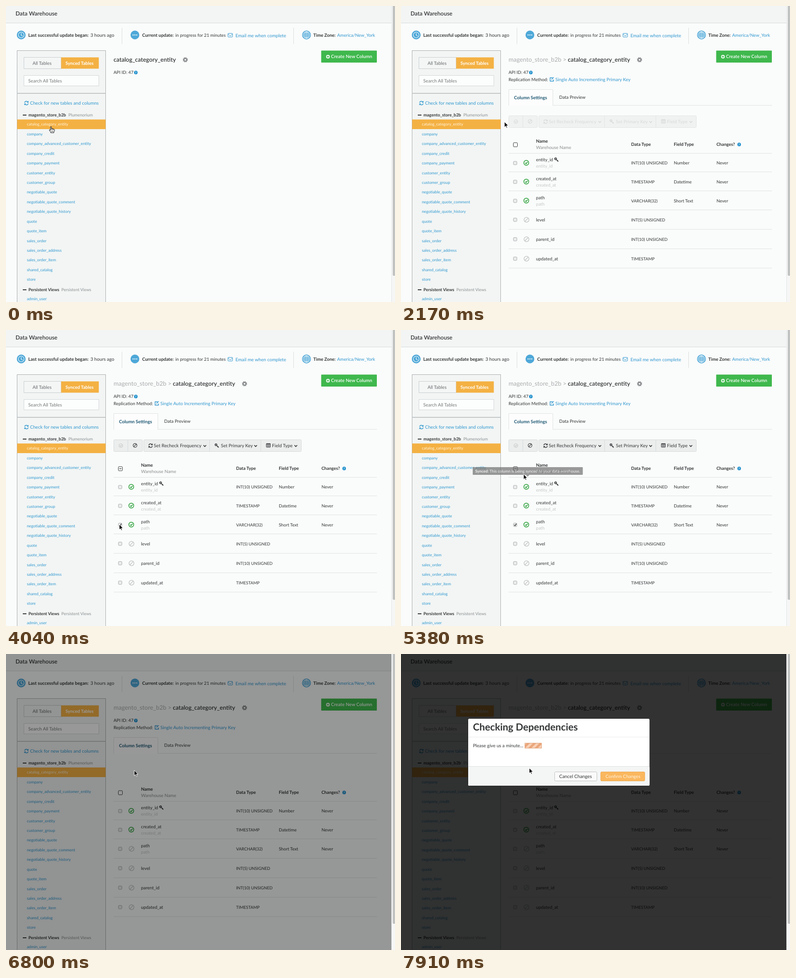
Write an HTML page that moves like this. It is 857x654 px and loops after 7.99 s.

```html
<!DOCTYPE html>
<html lang="en">
<head>
<meta charset="utf-8">
<title>Data Warehouse</title>
<style>
html, body { margin: 0; width: 857px; height: 654px; overflow: hidden; background: #fafbfb; }
svg { display: block; font-family: Lato, "Open Sans", sans-serif; text-rendering: geometricPrecision; }
text { white-space: pre; }
</style>
</head>
<body>
<svg id="stage" width="857" height="654" viewBox="0 0 857 654"></svg>
<script>
const LOOP = 7990;
const INK = '#333536', BLUE = '#2f97cf', SKY = '#4ea8d8', AMBER = '#f4b143', GREEN = '#35a543',
      RULE = '#e0e2e2', MUTED = '#8a8d8e', PALE = '#c6c8c8';

// Drawing helpers
const text = (x, y, str, size = 9.8, fill = INK, weight = 400) =>
  `<text x="${x}" y="${y}" font-size="${size}" fill="${fill}" font-weight="${weight}">${str}</text>`;
const bold = (x, y, str, size = 9.9, fill = INK) => text(x, y, str, size, fill, 700);
const rect = (x, y, w, h, fill, stroke = 'none', r = 0) =>
  `<rect x="${x}" y="${y}" width="${w}" height="${h}" fill="${fill}" stroke="${stroke}" rx="${r}"/>`;
const path = (d, stroke, width = 1, fill = 'none') =>
  `<path d="${d}" stroke="${stroke}" stroke-width="${width}" fill="${fill}"/>`;
const dot = (x, y, r, fill, stroke = 'none', width = 1) =>
  `<circle cx="${x}" cy="${y}" r="${r}" fill="${fill}" stroke="${stroke}" stroke-width="${width}"/>`;
const group = (id, body) => `<g id="${id}">${body}</g>`;

// Icons
const tick = (x, y, c, r = 5.4) => dot(x, y, r, 'none', c, r / 3.4) +
  path(`M${x - r * .46} ${y}l${r * .36} ${r * .38} ${r * .62} ${-r * .72}`, c, r / 3);
const ban = (x, y, c, r = 5.4) => dot(x, y, r, 'none', c, r / 3.6) +
  path(`M${x - r * .66} ${y + r * .66}l${r * 1.32} ${-r * 1.32}`, c, r / 3.6);
const help = (x, y) => dot(x, y, 3.9, '#2090cc') + bold(x - 1.7, y + 2.5, '?', 7, '#fff');
const gear = (x, y) => dot(x, y, 3.2, 'none', MUTED, 2.6) +
  `<circle cx="${x}" cy="${y}" r="4.8" fill="none" stroke="${MUTED}" stroke-width="1.8" stroke-dasharray="1.885"/>`;
const refresh = (x, y, c) =>
  path(`M${x - 4} ${y - .8}a4 4 0 0 1 7-1.8M${x + 4} ${y + .8}a4 4 0 0 1-7 1.8`, c, 1.5) +
  path(`M${x + 4.6} ${y - 5}v4h-4zM${x - 4.6} ${y + 5}v-4h4z`, 'none', 0, c);
const wrench = (x, y, c) => dot(x - 1.9, y - 1.9, 2, 'none', c, 1.6) +
  path(`M${x - .5} ${y - .5}l4.6 4.6M${x + 1.4} ${y + 3.2}l1.8-1.8`, c, 1.5);
const chevron = (x, y, c) => path(`M${x - 3} ${y - 1.5}l3 3 3-3`, c, 1.7);
const grid = (x, y, c) => rect(x - 4.5, y - 4, 9, 8, 'none', c, .5) +
  path(`M${x - 4.5} ${y - 3}h9`, c, 1.6) + path(`M${x - 4.5} ${y + 1}h9M${x - 1.5} ${y - 4}v8M${x + 1.5} ${y - 4}v8`, c, .9);
const minus = y => path(`M37 ${y}h8`, INK, 2);
const box = (x, y, size, stroke, fill) => rect(x - size / 2, y - size / 2, size, size, fill, stroke, 1.5);
const loader = (x, y, base, edge) => rect(x, y, 36.5, 11, base) + rect(x, y, 36.5, 11, 'url(#stripes)', edge);

function header() {
  return rect(0, 0, 849, 37, '#f3f5f5') + path('M0 37.5H849', '#d6dada') +
    text(21, 21, 'Data Warehouse', 12.5, INK, 600) +
    dot(33.5, 64, 9.7, SKY) + dot(33.5, 64, 6.3, 'none', '#fff', 1.1) + path('M33.5 60v4.5l3 1.8', '#fff', 1.1) +
    bold(49, 68, 'Last successful update began:', 10.1) + text(186, 68, '3 hours ago', 10.2) +
    path('M255.5 48v36M633.5 48v36', '#dbdede') +
    dot(284, 64, 9.7, SKY) + [-4, 0, 4].map(d => dot(284 + d, 64, 1.2, '#fff')).join('') +
    bold(300, 68, 'Current update:') + text(373, 68, 'in progress for 21 minutes', 9.7) +
    rect(489, 60.5, 10, 8, 'none', BLUE, 1) + path('M489 62l5 4 5-4', BLUE) +
    text(505.5, 68.5, 'Email me when complete', 10.2, BLUE) +
    dot(662, 64, 9.7, SKY) + dot(662, 64, 7.4, 'none', '#fff') +
    [1.4, 4.6].map(r => `<ellipse cx="662" cy="64" rx="${r}" ry="7.4" fill="none" stroke="#fff"/>`).join('') +
    bold(677, 68, 'Time Zone:') + text(729.5, 68, 'America/New_York', 9.8, BLUE);
}

function sidebar() {
  const tables = ['catalog_category_entity', 'company', 'company_advanced_customer_entity', 'company_credit',
    'company_payment', 'customer_entity', 'customer_group', 'negotiable_quote', 'negotiable_quote_comment',
    'negotiable_quote_history', 'quote', 'quote_item', 'sales_order', 'sales_order_address',
    'sales_order_item', 'shared_catalog', 'store'];
  return rect(24.5, 98.5, 195, 570, '#f2f5f4', '#a9adae') + path('M24 193H220', '#b4b8b9', 1.4) +
    rect(39.5, 113.5, 82, 25, '#f4f6f6', '#c9cdcd') + text(58.5, 130, 'All Tables', 10.2, '#66696a') +
    rect(121.5, 113.5, 83, 25, AMBER) + bold(131, 130, 'Synced Tables', 10, '#fff') +
    rect(39.5, 153.5, 165, 23, '#fcfdfd', '#d3d7d7') + text(49, 169, 'Search All Tables', 10.2, '#77797a') +
    refresh(45, 214.5, BLUE) + text(53, 218.2, 'Check for new tables and columns', 10.1, BLUE) +
    minus(241) + bold(49.5, 244, 'magento_store_b2b', 9.4) + text(137.5, 244, 'Plumenorium', 9.2, MUTED) +
    rect(24.5, 250.7, 195, 21.3, AMBER) + group('hover', rect(25, 273, 194, 21, '#e5e9e9')) +
    tables.map((name, i) => text(46, 264.3 + i * 21.44, name, 8.72, i ? BLUE : '#fff6e3')).join('') +
    minus(627) + bold(49.5, 629.5, 'Persistent Views', 9.2) + text(122, 629.5, 'Persistent Views', 9.1, MUTED) +
    text(46, 650.3, 'admin_user', 8.72, BLUE);
}

function toolbar(c) {
  const edge = '#d6d9d9';
  return rect(237.5, 242.5, 63, 26, '#eceeee', edge, 2) + rect(303.5, 242.5, 347, 26, '#eceeee', edge, 2) +
    `<rect class="press" x="269" y="243" width="31" height="25" fill="#d3d6d6" stroke="#bfc2c2"/>` +
    path('M268.5 242v27M448.5 242v27M561.5 242v27', edge) +
    tick(253, 255.5, PALE, 4) + ban(284.3, 255, c, 4.2) +
    refresh(318.5, 255.5, c) + text(325.5, 259, 'Set Recheck Frequency', 10.3, c) + chevron(438, 256, c) +
    wrench(464.5, 255.5, c) + text(473.5, 259, 'Set Primary Key', 10.1, c) + chevron(550, 256, c) +
    grid(578, 255, c) + text(586, 259, 'Field Type', 10.2, c) + chevron(638.5, 256, c);
}

function row(y, name, type, field) {
  const base = y + 3.3;
  const cells = box(251.5, y, 7.5, '#a7aaab', '#eceded') + text(507, base, type, 9.2);
  if (!field) return cells + ban(276.5, y, PALE) + text(297.5, base, name, 9.9);
  return cells + (name === 'path' ? group('synced', tick(276, y - .5, GREEN)) + group('unsynced', ban(276.5, y, PALE))
                                  : tick(276, y - .5, GREEN)) +
    text(297.5, y - 3.8, name, 9.8) + text(297.5, y + 10.3, name, 9.6, PALE) +
    text(601, base, field, 9.6) + text(695, base, 'Never', 9.7);
}

function table() {
  const line = y => path(`M237 ${y}H817`, RULE);
  return bold(297.5, 302, 'Name') + text(297.5, 316, 'Warehouse Name', 9.9, MUTED) +
    bold(507, 309.3, 'Data Type', 9.7) + bold(601, 309.3, 'Field Type', 9.8) + bold(695, 309.3, 'Changes?', 9.6) +
    help(745, 306) + box(252, 306.5, 9, INK, '#fdfdfd') + group('partial', path('M249.5 306.5h5', INK, 1.3)) +
    [325.5, 366.5, 408.5].map(line).join('') +
    row(347, 'entity_id', 'INT(10) UNSIGNED', 'Number') + wrench(342.5, 339.5, INK) +
    row(388.5, 'created_at', 'TIMESTAMP', 'Datetime') +
    row(430.5, 'path', 'VARCHAR(32)', 'Short Text') +
    group('checked', path('M249.3 430.5l2 2 3-4.5', INK, 1.4)) +
    group('lower', [450.5, 493.5, 536.5, 579].map(line).join('') + row(472.3, 'level', 'INT(5) UNSIGNED') +
      row(515.3, 'parent_id', 'INT(10) UNSIGNED') + row(558.3, 'updated_at', 'TIMESTAMP'));
}

function details() {
  return text(237, 123, 'magento_store_b2b &gt;', 13.4, '#aaadae') +
    text(367.5, 123, 'catalog_category_entity', 13, INK, 600) + gear(525.5, 118.8) +
    text(237, 165.8, 'Replication Method:', 9.8) +
    path('M334 158.5h-5.5v7.5h7.5v-3.5M331.5 162.5l5-5', BLUE, 1.4) +
    text(340, 166, 'Single Auto Incrementing Primary Key', 10, BLUE) +
    path('M334.5 219.5V184.5H237.5V220', RULE, 1, '#fdfdfd') + path('M334 219.5H817', RULE) +
    bold(249, 206, 'Column Settings', 10, '#1c5672') + text(348.5, 205, 'Data Preview', 9.9) +
    group('idle', toolbar(PALE)) + group('active', toolbar(INK)) + table();
}

const tip = (id, x, y, w, arrow, label) => group(id, rect(x, y, w, 17, '#6f706f', 'none', 1) +
  path(`M${arrow - 4} ${y + 17}h8l-4 4z`, 'none', 0, '#6f706f') + text(x + 5.5, y + 11.7, label, 8.68, '#f3f3f3'));

function modal() {
  return rect(147.5, 142.5, 400.5, 149, '#fff', '#222', 3) + path('M148 183.5H547', '#e9eaea') +
    bold(158.5, 169.3, 'Checking Dependencies', 21.6) +
    text(158.5, 206, 'Please give us a minute...', 10.2) + loader(273, 197, '#f8d0b6', '#e09a6c') +
    rect(148, 249, 399.5, 42, '#f4f5f5', 'none', 2) + path('M148 248.5H547', '#dcdede') +
    rect(338.5, 260.5, 93, 20, '#fafafa', '#bfc1c1', 2) + text(348.5, 273.8, 'Cancel Changes', 10.35) +
    rect(440, 260.5, 97, 20, '#fab75e', '#eda94f', 2) + text(450.5, 273.8, 'Confirm Changes', 10.2, '#fff3e0');
}

const stage = document.getElementById('stage');
stage.innerHTML =
  `<defs><pattern id="stripes" width="14" height="14" patternUnits="userSpaceOnUse">${rect(0, 0, 7, 14, '#eaa67b')}</pattern></defs>` +
  rect(0, 0, 857, 654, '#fafbfb') + header() + sidebar() +
  rect(694.4, 98.4, 122.6, 26.6, '#3fb84d', 'none', 1) + dot(709.3, 112, 4, '#fff') +
  path('M706.8 112h5M709.3 109.5v5', '#3fb84d', 1.4) + text(716, 115.3, 'Create New Column', 10.2, '#fff', 600) +
  text(237, 150.3, 'API ID: 47', 9.7) + help(286, 147) +
  group('loading', text(237, 123, 'catalog_category_entity', 13, INK, 600) + gear(395, 118.8)) +
  group('details', details()) +
  tip('syncedTip', 158, 303, 242.5, 279, '<tspan font-weight="700">Synced</tspan>: This column is being synced to your data warehouse.') +
  tip('stopTip', 168.5, 218, 231, 284.5, 'Stop syncing selected column(s) from your data warehouse') +
  group('shade', rect(0, 0, 849, 654, '#000')) +
  group('busy', `<g opacity=".45">${loader(509, 258, '#b0582a', '#b0582a')}</g>`) +
  group('modal', modal()) +
  rect(849, 0, 8, 654, '#f6f6f6') + path('M849.5 0V654', '#e4e5e5') + rect(852, -4, 8, 600, '#c1c2c2', 'none', 2) +
  group('arrow', path('M0 0V11.8L2.8 9.2 4.7 13.4 6.5 12.6 4.7 8.5H8.4Z', '#fff', 1, '#000')) +
  group('hand', path('M-1 1.2Q0-.6 1.2 1.2V5.4L3 5 5 5.6 7 6.3 8 7.6 7.6 10.6 6.5 12.4V14H-.6V12.6L-3.6 8.6Q-3.6 6.9-2 7.6L-1 8.8Z', '#000', 1, '#fff') +
    path('M1.2 5.5V8M3.4 5.6V8M5.5 6.2V8.2M1.2 9.6v2.6M3 9.6v2.6M4.8 9.6v2.6', '#000', .7));

const bursts = [[0, 0, 1], [90, 90, 1], [240, 1020, 10], [1650, 2440, 10], [2530, 3140, 8], [3950, 4040, 2],
  [4850, 5630, 10], [5720, 6080, 5], [6710, 6890, 3], [7040, 7040, 1], [7190, 7370, 3], [7640, 7910, 4]];
function heldTime(t) {
  const [start, end, steps] = bursts.findLast(b => b[0] <= t);
  const step = (end - start) / (steps - 1) || 1;
  return Math.min(end, start + Math.floor((t - start) / step + .15) * step);
}

// Keys are [time, ...values]
const cursorKeys = [[0, 99, 266], [90, 101, 265], [240, 102, 264], [1020, 107, 279], [1650, 107, 279],
  [1900, 155, 271], [2175, 228, 256], [2440, 214, 260], [2600, 222, 290], [2880, 285, 395], [3140, 249.5, 429.5],
  [4800, 249.5, 429.5], [5110, 268, 372], [5200, 272, 348], [5370, 270, 318.5], [5630, 280, 284],
  [5990, 284, 258], [6710, 284, 258], [6800, 282.5, 257], [7640, 282.5, 257], [7910, 282.5, 252]];
const modalKeys = [[7040, -193, .4], [7190, -80, .8], [7280, -25, .95], [7370, 0, 1]];
function at(keys, t) {
  const i = keys.findIndex(k => k[0] > t);
  if (i < 0) return keys.at(-1).slice(1);
  if (!i) return keys[0].slice(1);
  const a = keys[i - 1], b = keys[i], u = (t - a[0]) / (b[0] - a[0]);
  return a.slice(1).map((v, j) => v + (b[j + 1] - v) * u);
}

const el = id => document.getElementById(id);
const fade = (id, opacity) => {
  el(id).style.display = opacity > 0 ? '' : 'none';
  el(id).style.opacity = +opacity;
};
const presses = document.querySelectorAll('.press');

function render(now) {
  const t = heldTime(now % LOOP);
  const loaded = t >= 1650, removed = t >= 6790;
  fade('hover', t > 600 && t < 1800);
  fade('loading', !loaded);
  fade('details', loaded);
  fade('idle', t < 4030 ? .65 : 0);
  fade('active', t >= 4030 && !removed);
  fade('partial', t >= 4030 && !removed);
  fade('checked', t >= 3950 && !removed);
  fade('synced', !removed);
  fade('unsynced', removed);
  el('lower').setAttribute('transform', `translate(0 ${+removed})`);
  presses.forEach(p => {
    p.style.display = t > 5880 ? '' : 'none';
    p.style.fill = t >= 6710 ? '#d0d3d3' : '#dcdede';
  });

  fade('syncedTip', t < 5190 || t > 5440 ? 0 : t > 5330 ? .7 : 1);
  fade('stopTip', t < 5880 || removed ? 0 : t < 5980 ? .5 : 1);
  fade('shade', t < 6790 ? 0 : t < 6880 ? .4 : .8);
  fade('busy', t >= 6880);

  const [drop, opacity] = at(modalKeys, t);
  fade('modal', t >= 7040 && opacity);
  el('modal').setAttribute('transform', `translate(0 ${drop})`);
  const slide = Math.max(0, t - 7550) / 90 * 3;
  el('stripes').setAttribute('patternTransform', `translate(${slide} 0) skewX(-45)`);

  const [x, y] = at(cursorKeys, t);
  const pointing = t < 2080 || (t > 5880 && !removed);
  fade('hand', pointing);
  fade('arrow', !pointing);
  el(pointing ? 'hand' : 'arrow').setAttribute('transform', `translate(${x} ${y})`);
  requestAnimationFrame(render);
}
requestAnimationFrame(render);
</script>
</body>
</html>
```
